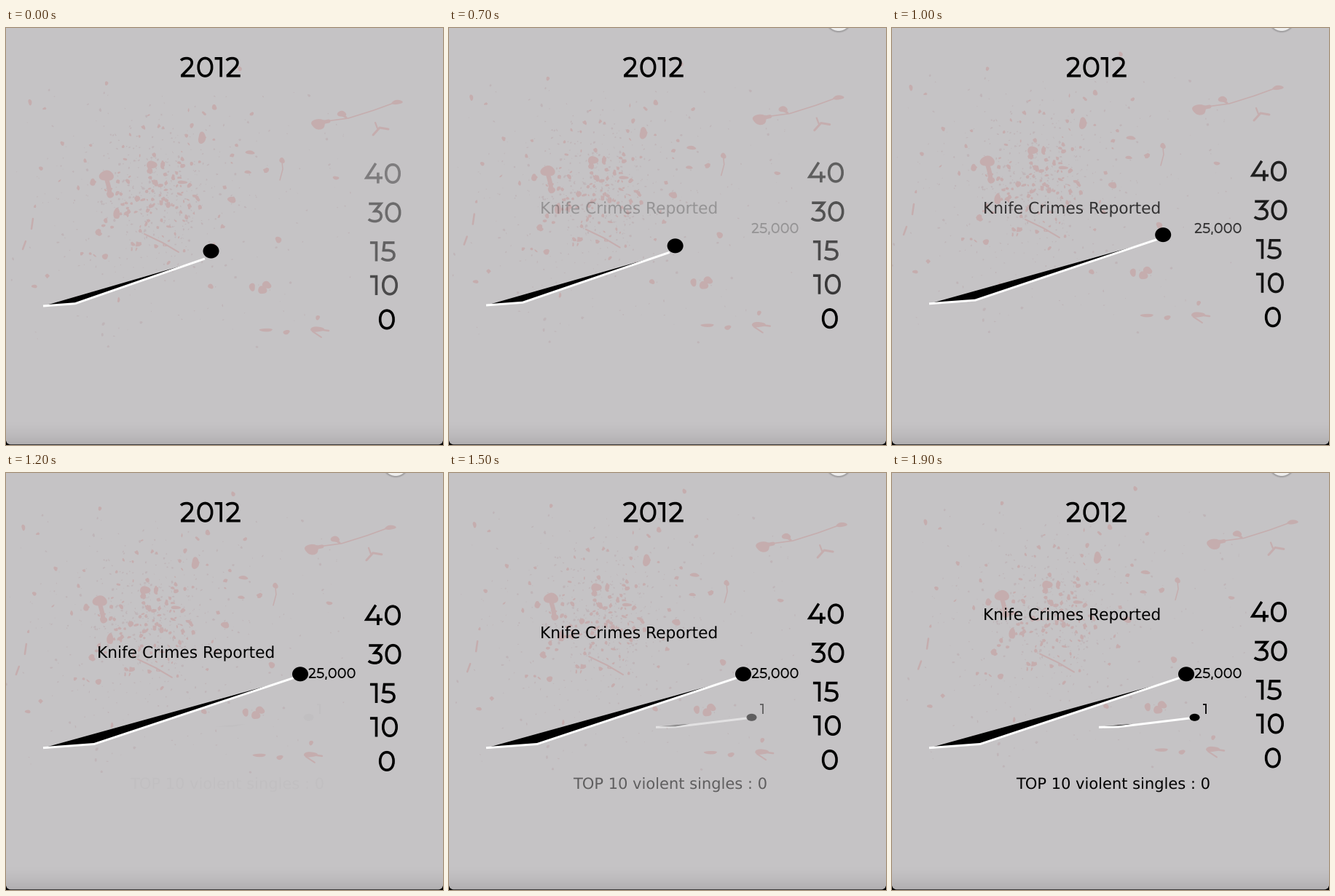
A matplotlib script for the animation above (3600 ms loop, 600x573 px).

```python
import numpy as np
import matplotlib.pyplot as plt
from matplotlib.animation import FuncAnimation
from matplotlib.patches import Circle, Ellipse, PathPatch, Polygon, Rectangle
from matplotlib.path import Path
from matplotlib.transforms import Affine2D

W, H, DPI = 600, 573, 64
PT = 72 / DPI
BG = "#c5c3c5"
STAIN, FAINT = "#c5adae", "#bfb5b8"

plt.rcParams["font.family"] = "DejaVu Sans"
plt.rcParams["text.hinting"] = "none"

fig = plt.figure(figsize=(W / DPI, H / DPI), dpi=DPI, facecolor=BG)
ax = fig.add_axes([0, 0, 1, 1])
ax.set_xlim(0, W)
ax.set_ylim(H, 0)
ax.axis("off")


# ---------- digits drawn as strokes, 1000 units per em ----------
GLYPHS = {
    "0": (665, "M 332 666 C 470 666 570 545 570 350 C 570 155 470 34 332 34 "
               "C 194 34 94 155 94 350 C 94 545 194 666 332 666 L 340 666"),
    "1": (375, "M 8 659 L 229 659 L 229 0"),
    "2": (578, "M 52 588 C 95 640 165 664 255 664 C 375 664 440 605 440 510 "
               "C 440 440 410 385 335 308 L 80 47 M 47 41 L 541 41"),
    "3": (576, "M 50 659 L 470 659 L 255 396 L 300 396 C 420 396 487 325 487 220 "
               "C 487 105 400 36 262 36 C 170 36 90 65 38 112"),
    "4": (674, "M 405 712 L 75 198 L 645 198 M 487 0 L 487 384"),
    "5": (577, "M 500 659 L 140 659 L 110 388 L 240 388 C 410 388 487 325 487 216 "
               "C 487 105 400 36 262 36 C 172 36 95 65 40 112"),
    ",": (225, "M 112 105 L 112 40 L 88 -115"),
}
CODES = {"M": [Path.MOVETO], "L": [Path.LINETO], "C": [Path.CURVE4] * 3}


def digit_path(text, size):
    verts, codes, pen = [], [], 0
    for ch in text:
        width, outline = GLYPHS[ch]
        nums = []
        for tok in outline.split():
            if tok in CODES:
                codes += CODES[tok]
            else:
                nums.append(float(tok))
        pts = np.array(nums).reshape(-1, 2)
        verts.append((pts + [pen, 0]) * [1, -1] * size / 1000)
        pen += width
    return Path(np.vstack(verts), codes)


def place(artist, x, y):
    artist.set_transform(Affine2D().translate(x, y) + ax.transData)


def number(text, x, y, size):
    patch = PathPatch(digit_path(text, size), fill=False, ec="black",
                      lw=size * 0.093 * PT, capstyle="butt",
                      joinstyle="miter", zorder=6)
    ax.add_patch(patch)
    place(patch, x, y)
    return patch


def label(text, x, y, size):
    return ax.text(x, y, text, size=size * PT, color="black",
                   ha="left", va="baseline", zorder=6)


# ---------- backdrop ----------
shade = np.linspace(0, 1, 34)[:, None] ** 1.6
for k, v in enumerate(shade[:, 0]):
    grey = np.array([197, 195, 197]) - 20 * v
    ax.add_patch(Rectangle((0, 538 + k), W, 1, fc=grey / 255, lw=0,
                           antialiased=False, zorder=0))
ax.add_patch(Rectangle((0, 572), W, 1, fc="#3a393a", lw=0, zorder=1))
for x, d in ((0, 1), (W, -1)):
    ax.add_patch(Polygon([(x, 567), (x + d * 1.5, 570.5), (x + d * 6, H), (x, H)],
                         fc="black", lw=0, zorder=1))

# ---------- stains ----------
rng = np.random.default_rng(12)


def blob(x, y, w, h, rough, n=20):
    t = np.linspace(0, 2 * np.pi, n, endpoint=False)
    a, b, tilt = rng.uniform(0, 2 * np.pi, 3)
    r = 1 + rough * (np.sin(2 * t + a) + 0.6 * np.sin(3 * t + b))
    pts = np.c_[x + w / 2 * r * np.cos(t), y + h / 2 * r * np.sin(t)]
    return Path(np.vstack([pts, pts[:1]]), closed=True)


def speck(x, y, size):
    t = np.linspace(0, 2 * np.pi, 8, endpoint=False)
    r = size * rng.uniform(0.7, 1.3, 8)
    tilt, flat = rng.uniform(0, np.pi), rng.uniform(0.4, 1)
    u, v = r * np.cos(t), flat * r * np.sin(t)
    pts = np.c_[x + u * np.cos(tilt) - v * np.sin(tilt),
                y + u * np.sin(tilt) + v * np.cos(tilt)]
    return Path(np.vstack([pts, pts[:1]]), closed=True)


BLOBS = [
    (138, 203, 18, 16), (143, 229, 9, 10), (269, 151, 11, 15), (286, 109, 7, 7),
    (321, 56, 5, 7), (255, 134, 5, 7), (200, 188, 13, 12), (335, 171, 13, 5),
    (379, 182, 7, 8), (374, 291, 9, 8), (338, 356, 9, 10), (352, 360, 11, 12),
    (358, 353, 12, 10), (428, 398, 6, 6), (39, 355, 7, 5), (357, 415, 20, 4),
    (385, 418, 9, 6), (427, 414, 17, 8), (33, 102, 5, 8), (119, 212, 8, 9),
    (48, 193, 6, 5), (136, 314, 9, 7), (152, 255, 8, 17), (453, 206, 8, 5),
    (332, 198, 10, 4), (310, 236, 12, 8), (242, 212, 12, 5), (138, 76, 5, 5),
    (281, 355, 7, 7), (429, 132, 21, 13), (461, 118, 11, 9), (537, 102, 15, 6),
]
DRIPS = [
    (6, [(138, 207), (141, 218), (143, 230)]),
    (1.5, [(379, 184), (380, 194), (376, 209)]),
    (5, [(428, 131), (443, 128)]),
    (1.6, [(440, 128), (470, 124), (505, 113), (538, 101)]),
    (3, [(461, 119), (467, 123)]),
    (3, [(504, 147), (513, 137), (525, 139)]),
    (2.2, [(507, 130), (510, 138)]),
    (2, [(421, 417), (433, 425)]),
    (2.5, [(428, 414), (443, 416)]),
    (2.5, [(37, 262), (35, 276)]),
    (2.5, [(27, 293), (23, 304)]),
    (2, [(190, 283), (215, 295), (237, 308)]),
]
stains = [blob(*b, 0.12) for b in BLOBS]
faint = []

for x, y in rng.normal((205, 225), (58, 48), (440, 2)):
    size = min(0.6 + rng.exponential(0.8), 4)
    (stains if size > 2 else faint).append(speck(x, y, size))
for x, y in rng.uniform((5, 85), (480, 440), (190, 2)):
    size = min(0.5 + rng.exponential(0.75), 3.2)
    (stains if size > 2.3 else faint).append(speck(x, y, size))
for x, y in rng.normal((210, 225), (24, 26), (45, 2)):
    stains.append(speck(x, y, rng.uniform(1.5, 4)))

splatter = [
    PathPatch(Path.make_compound_path(*faint), fc=FAINT, lw=0, zorder=2),
    PathPatch(Path.make_compound_path(*stains), fc=STAIN, lw=0, zorder=2.1),
]
splatter += [PathPatch(Path(pts), fill=False, ec=STAIN, lw=w * PT,
                       capstyle="round", joinstyle="round", zorder=2.1)
             for w, pts in DRIPS]
for part in splatter:
    ax.add_patch(part)

# ---------- round button at the top edge ----------
button = [Circle((535, -13 + 0.5), 17.5 + k * 0.6, fc="black", alpha=0.05, lw=0, zorder=3)
          for k in range(4)]
button.append(Circle((535, -13), 17, fc="#ededed", lw=0, zorder=3.1))
for part in button:
    ax.add_patch(part)


# ---------- knives ----------
def knife(rx, ry, edge_w):
    blade = Polygon([(0, 0)] * 3, fc="black", lw=0, zorder=4)
    knob = Ellipse((0, 0), 2 * rx, 2 * ry, fc="black", lw=0, zorder=5)
    ax.add_patch(blade)
    ax.add_patch(knob)
    edge, = ax.plot([], [], color="white", lw=edge_w * PT, zorder=4.5,
                    solid_capstyle="butt", solid_joinstyle="miter")
    return blade, edge, knob


def pose(parts, tip, knee, end, top, knob_at):
    blade, edge, knob = parts
    blade.set_xy([(tip[0] + 4, tip[1] - 1), knee, top])
    edge.set_data(*zip(tip, knee, end))
    knob.center = knob_at


# tip, knee, edge end, blade top, knob
CLOSED = np.array([(51, 382), (95, 378.7), (273, 317), (244, 326), (281.5, 306.5)])
OPEN = np.array([(51, 377.7), (121, 372.5), (398, 280.5), (373, 288.5), (404, 276.3)])
big = knife(11, 10, 3)
small = knife(7, 5, 3)
pose(small, (284, 349.3), (311, 348.8), (410, 336.8), (330, 344.8), (415.5, 335.8))

# ---------- texts ----------
number("2012", 238.2, 67.3, 38.7)
SCALE = [("40", 492, 213.5, 0.36), ("30", 496.3, 267, 0.45), ("15", 499.6, 320.5, 0.5),
         ("10", 499.6, 367, 0.62), ("0", 510, 414, 1)]
scale = [number(t, x, y, 38.7) for t, x, y, _ in SCALE]
reported = label("Knife Crimes Reported", 125, 255.3, 21.8)
amount = number("25,000", 415, 281.7, 19.4)
singles = label("TOP 10 violent singles : 0", 170, 435, 21)
rank = number("1", 427, 331, 19.4)


def ramp(s, start, length):
    return float(np.clip((s - start) / length, 0, 1))


def draw(i):
    s = min(max(i - 5, 0), 14)
    p = ramp(s, 0.58, 5.97)
    q = ramp(s, 6.9, 6)

    for part in splatter:
        place(part, -9.5 * p + 22.5 * q, -27 * p - 7.5 * q)
    for part in button:
        part.set_visible(s > 0)

    pose(big, *(CLOSED + (OPEN - CLOSED) * p))
    for part in (*small, singles, rank):
        part.set_alpha(q)

    for art, (_, x, y, a) in zip(scale, SCALE):
        place(art, x, y - 9 * s / 14)
        art.set_alpha(a + (1 - a) * p)

    reported.set_y(255.3 - 53 * q)
    reported.set_alpha(p)
    amount.set_alpha(p)
    return []


anim = FuncAnimation(fig, draw, frames=36, interval=100, repeat=True,
                     repeat_delay=0, blit=False)
plt.show()
```
